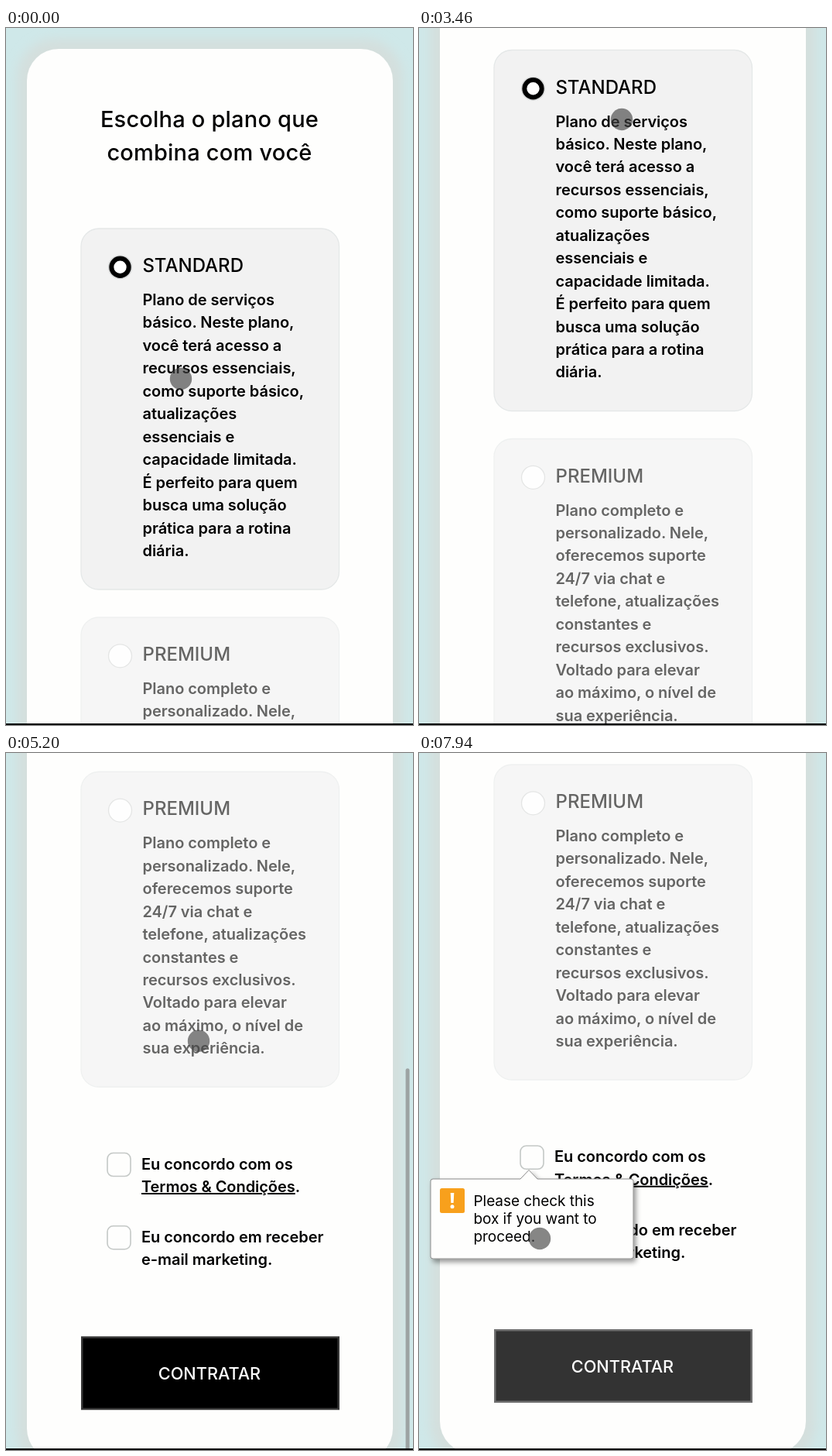
An HTML page that plays this animation: 526 by 900 pixels, repeating every 8000 ms.

```html
<!DOCTYPE html>
<html lang="pt">
<head>
<meta charset="utf-8">
<title>Planos</title>
<style>
  html, body { margin: 0; width: 100%; height: 100%; overflow: hidden; background: #cfe8e9; }
  svg { display: block; width: 526px; height: 900px; }
  text { font-family: Poppins, Inter, "Open Sans", sans-serif; font-weight: 500; fill: #000; white-space: pre; }
  .title { font-size: 29px; letter-spacing: .2px; text-anchor: middle; }
  .name { font-size: 24px; }
  .body { font-size: 20px; font-weight: 600; letter-spacing: -.05px; }
  .button { font-size: 21.7px; text-anchor: middle; fill: #fff; }
  .tip { font-family: Inter, Roboto, sans-serif; font-size: 19px; font-weight: 400; letter-spacing: -.05px; }
  .link { text-decoration: underline; text-decoration-thickness: 1.5px; text-underline-offset: 2px; }
</style>
</head>
<body>
<svg viewBox="0 0 526 900">
  <defs>
    <filter id="glow" filterUnits="userSpaceOnUse" x="-40" y="-40" width="610" height="1780">
      <feGaussianBlur stdDeviation="7"/>
    </filter>
    <filter id="shade" x="-10%" y="-20%" width="125%" height="150%">
      <feDropShadow dx="3" dy="4" stdDeviation="3" flood-color="#000" flood-opacity=".4"/>
    </filter>
  </defs>
  <rect width="526" height="900" fill="#cfe8e9"/>
  <g id="page">
    <rect x="14" y="14" width="499" height="1649" rx="50" fill="#d4dfdd" filter="url(#glow)"/>
    <rect x="27" y="27" width="473" height="1623" rx="41" fill="#fefefd"/>
    <text class="title" x="263" y="128">Escolha o plano que</text>
    <text class="title" x="263" y="171">combina com você</text>
    <g id="cards"></g>
    <g id="checks"></g>
    <g id="button">
      <rect id="edge" x="97" y="1490" width="334" height="95"/>
      <rect id="face" x="99.5" y="1492.5" width="329" height="90"/>
      <text class="button" x="263" y="1545.5">CONTRATAR</text>
    </g>
  </g>
  <rect id="bar" x="516.5" width="5" height="509" rx="2.5" fill="#9da3a3"/>
  <g id="tip">
    <path d="M18 550H131L142 538.5L153 550H274Q277 550 277 553V650Q277 653 274 653H18Q15 653 15 650V553Q15 550 18 550Z"
      fill="#fefefd" stroke="#8a8a8a" filter="url(#shade)"/>
    <rect x="27" y="562" width="32" height="32" rx="2.5" fill="#f8a01c"/>
    <path d="M40.7 568H45.3L44.6 581H41.4Z" fill="#fff"/>
    <circle cx="43" cy="585.8" r="2.5" fill="#fff"/>
    <text class="tip" x="70.5" y="585">Please check this</text>
    <text class="tip" x="70.5" y="608">box if you want to</text>
    <text class="tip" x="70.5" y="631">proceed.</text>
  </g>
  <circle id="cursor" r="14.2" fill="#424242" fill-opacity=".64"/>
  <rect y="898" width="526" height="2"/>
</svg>
<script>
const LOOP = 8000, PITCH = 29.45;
const $ = id => document.getElementById(id);

const lines = (x, y, rows) => rows.map((row, i) =>
  `<text class="body" x="${x}" y="${y + i * PITCH}">${row}</text>`).join('');

const card = (id, y, height, name, rows) => `
  <g id="${id}">
    <rect x="97" y="${y}" width="333.5" height="${height}" rx="23" fill="#f2f2f2" stroke="#e5e8e8" stroke-width="1.3"/>
    <circle cx="147.5" cy="${y + 49.8}" r="15" fill="#fff" stroke="#d4d6d6" stroke-width="1.3"/>
    <circle class="ring" cx="147.5" cy="${y + 49.8}" r="11.2" fill="#fff" stroke="#000" stroke-width="6"/>
    <text class="name" x="176.5" y="${y + 56}">${name}</text>
    ${lines(176.5, y + 99, rows)}
  </g>`;

const check = (y, rows) =>
  `<rect x="131" y="${y}" width="30" height="30" rx="7.5" fill="#fefefd" stroke="#c4c8c6" stroke-width="1.6"/>`
  + lines(175, y + 21, rows);

$('cards').innerHTML =
  card('standard', 259, 466, 'STANDARD', [
    'Plano de serviços', 'básico. Neste plano,', 'você terá acesso a', 'recursos essenciais,',
    'como suporte básico,', 'atualizações', 'essenciais e', 'capacidade limitada.',
    'É perfeito para quem', 'busca uma solução', 'prática para a rotina', 'diária.']) +
  card('premium', 761, 407, 'PREMIUM', [
    'Plano completo e', 'personalizado. Nele,', 'oferecemos suporte', '24/7 via chat e',
    'telefone, atualizações', 'constantes e', 'recursos exclusivos.', 'Voltado para elevar',
    'ao máximo, o nível de', 'sua experiência.']);

$('checks').innerHTML =
  check(1253.3, ['Eu concordo com os', '<tspan class="link">Termos &amp; Condições</tspan>.']) +
  check(1347.5, ['Eu concordo em receber', 'e-mail marketing.']);

// Pointer stops: time, x, y
const STOPS = [
  [30, 226, 453], [480, 236, 604], [940, 236, 604], [1250, 233, 580], [2120, 233, 580],
  [2840, 262, 118], [3960, 262, 118], [4610, 260, 322], [5100, 260, 322], [5540, 178, 694],
  [6000, 178, 694], [6480, 205, 788], [7120, 205, 788], [7580, 200, 776], [7660, 200, 776],
  [7940, 156, 627]
];

const part = (t, from, to) => Math.min(1, Math.max(0, (t - from) / (to - from)));
const smooth = p => p * p * (3 - 2 * p);
const glide = p => 1 - (1 - p) ** 2;
const mix = (a, b, p) => a + (b - a) * p;
const grey = v => `rgb(${v},${v},${v})`;

function pointer(t) {
  const i = STOPS.findIndex(s => s[0] > t);
  if (i === 0) return STOPS[0].slice(1);
  if (i < 0) return STOPS[STOPS.length - 1].slice(1);
  const [t0, x0, y0] = STOPS[i - 1], [t1, x1, y1] = STOPS[i];
  const p = smooth(part(t, t0, t1));
  return [mix(x0, x1, p), mix(y0, y1, p)];
}

function choose(id, on) {
  $(id).setAttribute('opacity', on ? 1 : .6);
  $(id).querySelector('.ring').setAttribute('visibility', on ? 'visible' : 'hidden');
}

function draw(t) {
  const scroll = 230.5 * glide(part(t, 477, 930)) + 515.5 * glide(part(t, 4755, 5270));
  $('page').setAttribute('transform', `translate(0 ${-scroll})`);

  const premium = t >= 1420 && t < 3060;
  choose('standard', !premium);
  choose('premium', premium);

  const bar = t < 3000
    ? part(t, 470, 510) - part(t, 1430, 1600)
    : part(t, 4750, 4790) - part(t, 5600, 5740);
  $('bar').setAttribute('y', 5 + scroll * .546);
  $('bar').setAttribute('opacity', bar);

  const hover = part(t, 6250, 6470);
  $('face').setAttribute('fill', grey(mix(0, 51, hover)));
  $('edge').setAttribute('fill', grey(mix(56, 112, hover)));

  $('tip').setAttribute('opacity', part(t, 6820, 7050));
  $('cursor').setAttribute('transform', `translate(${pointer(t)})`);
}

const start = performance.now();
function tick() {
  draw((performance.now() - start) % LOOP);
  requestAnimationFrame(tick);
}
draw(0);
requestAnimationFrame(tick);
</script>
</body>
</html>
```
